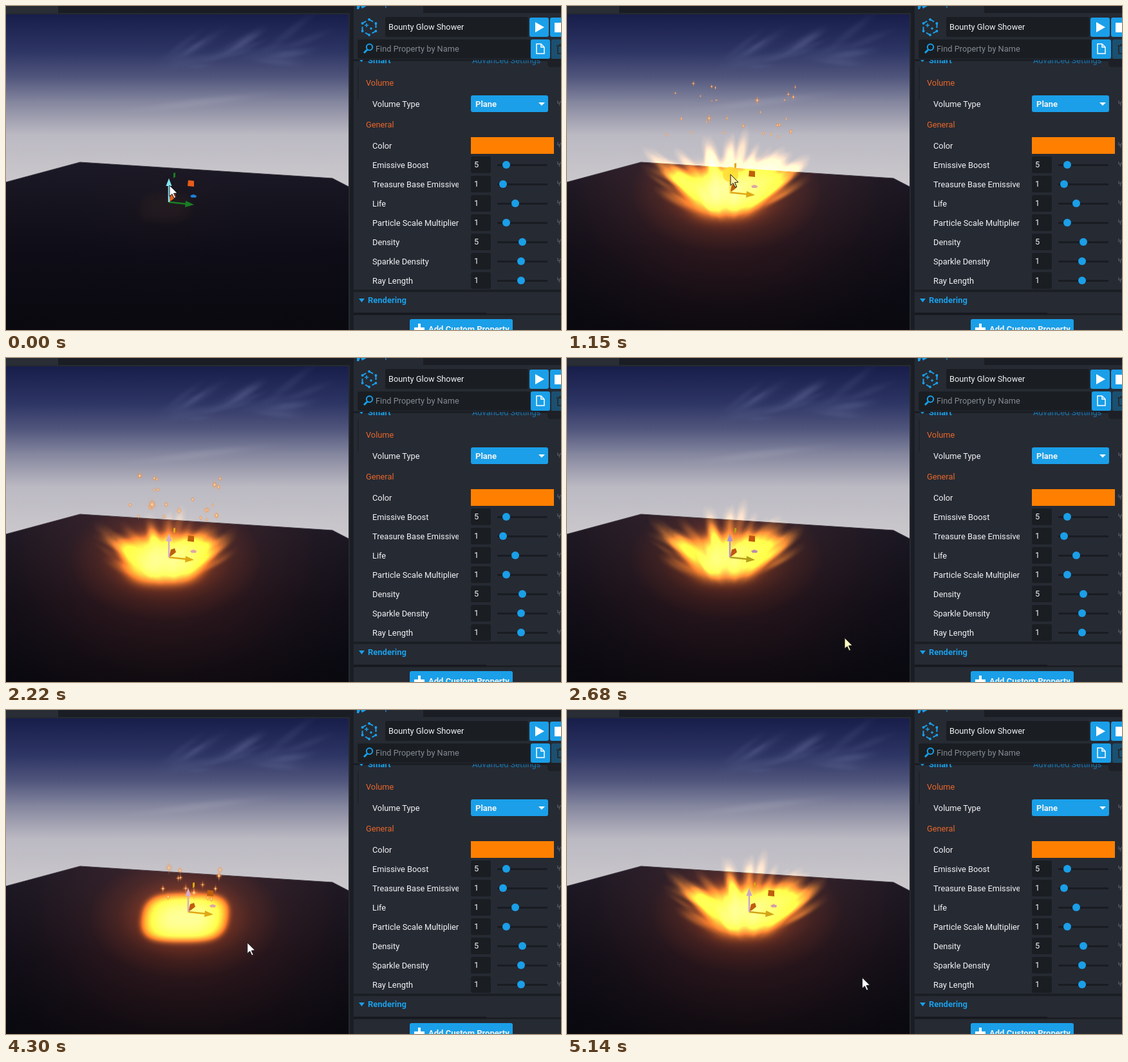
These frames come from a looping animation (862x504 px, 5.22 s). An HTML page with a canvas:

```html
<!DOCTYPE html>
<html lang="en">
<head>
<meta charset="utf-8">
<title>Particle effect editor</title>
<style>
  html, body { margin: 0; width: 100%; height: 100%; overflow: hidden; background: #1a1e24; }
  canvas, svg { position: absolute; left: 0; top: 0; }
  text { font: 12.8px Roboto, "Open Sans", sans-serif; fill: #f2f3f5; }
  .b { font-size: 13px; font-weight: 700; }
  .blue { fill: #1a9fe8; }
  .orange { fill: #e8672a; }
  .field { fill: #1a1e23; }
</style>
</head>
<body>
<canvas id="view" width="862" height="504"></canvas>
<svg id="panel" width="862" height="504">
  <defs>
    <clipPath id="label"><path d="M540 84H703V504H540z"/></clipPath>
    <clipPath id="list"><path d="M540 84H862V504H540z"/></clipPath>
  </defs>
  <path fill="#1a1e24" d="M0 0H862V13H0zM532 0H540V504H532z"/>
  <path fill="#292d35" d="M0 0H81V11H0z"/>
  <path fill="#262a30" d="M0 11H534V13H0zM532 13H534V504H532z"/>
  <path fill="#262a33" d="M540 11H862V504H540zM540 0H648V12H540z"/>
  <path class="blue" d="M545 0h5l-2 5h-3zM551 0h9l-7 4z"/>
  <text class="blue" x="569" y="0">Properties</text>

  <g fill="none" stroke="#1a9fe8" stroke-width="2">
    <path d="M564 21L574.500 27V39L564 45L553.500 39V27Z" stroke-dasharray="7 5"/>
    <path d="M560 27v6M557 30h6M567 33v4M565 35h4" stroke-width="1.500"/>
  </g>
  <g id="nodes" class="blue"></g>
  <rect class="field" x="589" y="17" width="222" height="31" rx="3"/>
  <text x="594" y="37">Bounty Glow Shower</text>
  <rect class="field" x="546" y="52" width="268" height="30" rx="3"/>
  <g fill="none" stroke="#1a9fe8" stroke-width="2">
    <circle cx="564.500" cy="64" r="4.700"/><path d="M561 68l-5 5" stroke-width="3"/>
  </g>
  <text x="574" y="71" style="fill:#858a92">Find Property by Name</text>
  <g class="blue">
    <rect x="813" y="18" width="30" height="30" rx="3"/>
    <rect x="845" y="18" width="30" height="30" rx="3"/>
    <rect x="815" y="52" width="30" height="30" rx="3"/>
  </g>
  <rect x="847" y="52" width="30" height="30" rx="3" fill="#1b5070"/>
  <path fill="#fff" d="M822 25L836 33L822 41zM852 26H862V41H852z"/>
  <path fill="none" stroke="#fff" stroke-width="1.500" d="M824 59h7l5 5v10h-12zM831 59v5h5"/>
  <path fill="none" stroke="#222e38" stroke-width="2" d="M855 62h9M857 63v11h7M859 60h5"/>
  <path fill="#181b20" d="M540 83H862V85.500H540z"/>

  <g clip-path="url(#list)">
    <path class="blue" d="M549 84h6l-3 3z"/>
    <text class="b blue" x="562" y="89">Smart</text>
    <text x="724" y="89" style="fill:#1a78b2">Advanced Settings</text>
    <path fill="#1d2127" d="M841 84H862V95H846Q841 95 841 90zM546 96h1.500v50h-1.500z"/>
  </g>
  <text class="orange" x="559" y="124">Volume</text>
  <text class="orange" x="559" y="189">General</text>
  <rect class="blue" x="722" y="139" width="120" height="26" rx="3"/>
  <text class="b" x="729" y="157">Plane</text>
  <path fill="#fff" d="M827 150h10l-5 5z"/>
  <path fill="#ff8000" d="M722 204H851V230H722z"/>
  <g id="rows" clip-path="url(#list)"></g>
  <path fill="#1b1f24" d="M540 441H862V445H540zM540 478H862V481H540z"/>
  <path fill="#17191e" d="M540 477H746V480H540z"/>
  <path class="blue" d="M548 455h9l-4.500 6z"/>
  <text class="b blue" x="562" y="462">Rendering</text>
  <rect class="blue" x="627" y="487" width="160" height="30" rx="3"/>
  <path fill="#fff" d="M640 494h4v6h6v4h-16v-4h6z"/>
  <text class="b" x="656" y="507">Add Custom Property</text>
</svg>
<script>
const byId = id => document.getElementById(id);
const times = (n, make) => Array.from({ length: n }, (_, i) => make(i));

byId("nodes").innerHTML = times(6, i =>
  `<circle cx="${564 + 12 * Math.sin(i * Math.PI / 3)}" cy="${33 - 12 * Math.cos(i * Math.PI / 3)}" r="2"/>`).join("");

const row = (name, y) => `<text x="569" y="${y + 5}" clip-path="url(#label)">${name}</text>
  <path d="M863 ${y - 4}a5 5 0 0 0 -3 7M857 ${y - 5}v4h4" fill="none" stroke="#50555c" stroke-width="1.500"/>`;
const slider = (value, knob, y) => `<rect class="field" x="722" y="${y - 13}" width="31" height="26" rx="3"/>
  <text x="727" y="${y + 4}">${value}</text>
  <rect x="763" y="${y - 1}" width="78" height="3" rx="1" fill="#191c21"/>
  <circle class="blue" cx="${knob}" cy="${y}" r="6"/>`;
const settings = [["Emissive Boost", 5, 777], ["Treasure Base Emissive", 1, 772], ["Life", 1, 791],
  ["Particle Scale Multiplier", 1, 777], ["Density", 5, 802], ["Sparkle Density", 1, 800], ["Ray Length", 1, 800]];
byId("rows").innerHTML = row("Volume Type", 152) + row("Color", 217) +
  settings.map(([name, value, knob], i) => row(name, 247 + 30 * i) + slider(value, knob, 247 + 30 * i)).join("");

const FRAMES = 68, LOOP = 5220, STEP = LOOP / FRAMES;
const ctx = byId("view").getContext("2d");

let seed = 11;
const rnd = () => (seed = seed * 16807 % 2147483647) / 2147483647;
const spread = () => rnd() * 2 - 1;
const rays = times(100, () => ({ u: spread(), v: spread(), h: rnd(), w: rnd() }));
const sparks = times(28, () => ({ u: spread(), v: spread(), s: .6 + rnd() ** 3 }));
const wisps = times(22, () => ({ u: spread(), v: spread(), w: rnd() }));

// peak: the moment the flame body is fullest; lead: how long sparks precede it
const bursts = [{ peak: 450, lead: 420, power: 1 }, { peak: 1840, lead: 250, power: .78 },
  { peak: 4300, lead: 1200, power: .92 }];
const cursorPath = [[0, 254, 279], [1150, 254, 262], [1550, 253, 282], [1840, 400, 520], [2250, 450, 520],
  [2680, 432, 436], [3300, 352, 369], [3600, 284, 312], [3960, 312, 317], [4300, 375, 362], [LOOP, 466, 421]];

const ramp = (a, b, t) => Math.min(1, Math.max(0, (t - a) / (b - a)));
const smooth = (a, b, t) => { const f = ramp(a, b, t); return f * f * (3 - 2 * f); };

function along(path, t) {
  const i = path.findIndex(k => k[0] > t), [t0, x0, y0] = path[i - 1], [t1, x1, y1] = path[i];
  const f = ramp(t0, t1, t);
  return [x0 + (x1 - x0) * f, y0 + (y1 - y0) * f];
}

function gizmoAt(t) {
  const lift = (5 + 15 * ramp(0, 1150, t)) * (1 - ramp(1150, 1550, t));
  const slide = smooth(3600, 3960, t);
  return [253 + 30 * slide, 310 + 4 * slide - lift];
}

function glow(x, y, rx, ry, angle, rgb, alpha) {
  ctx.save();
  ctx.translate(x, y);
  ctx.rotate(angle);
  ctx.scale(rx, ry);
  const g = ctx.createRadialGradient(0, 0, 0, 0, 0, 1);
  for (const [p, k] of [[0, 1], [.35, .75], [.7, .22], [1, 0]]) g.addColorStop(p, `rgba(${rgb},${alpha * k})`);
  ctx.fillStyle = g;
  ctx.fillRect(-1, -1, 2, 2);
  ctx.restore();
}

function vertical(y0, y1, stops) {
  const g = ctx.createLinearGradient(0, y0, 0, y1);
  stops.forEach(([y, c]) => g.addColorStop((y - y0) / (y1 - y0), c));
  return g;
}

function trace(points) {
  ctx.beginPath();
  points.forEach(([x, y]) => ctx.lineTo(x, y));
}

function poly(points, fill) {
  trace(points);
  ctx.closePath();
  ctx.fillStyle = fill;
  ctx.fill();
}

const skyFill = vertical(13, 274, [[13, "#181e4a"], [70, "#2d3564"], [110, "#50557c"], [150, "#85879f"],
  [200, "#bbb9c2"], [274, "#cbc8cc"]]);
const groundFill = vertical(243, 504, [[243, "#1b1926"], [300, "#15141f"], [380, "#0e0d17"], [504, "#09090f"]]);
const ground = [[0, 274], [115, 243], [507, 268], [532, 281], [532, 504], [0, 504]];

function scene() {
  ctx.fillStyle = skyFill;
  ctx.fillRect(0, 13, 532, 270);
  for (const { u, v, w } of wisps)
    glow(370 + u * 110, 68 - u * 14 + v * 30, 25 + 45 * w, 5 + 7 * w, -.35 + .5 * v, "115,124,170", .13);
  glow(300, 150, 130, 10, -.12, "195,195,210", .16);
  poly(ground, groundFill);
  ctx.strokeStyle = "#35323d";
  ctx.lineWidth = 1;
  trace(ground.slice(0, 4));
  ctx.stroke();
}

// Soft rounded slab whose top widens with flare.
function slab(x, y, scale, flare, blur, rgb, alpha) {
  const pow = v => Math.sign(v) * Math.abs(v) ** .75;
  ctx.filter = `blur(${blur}px)`;
  poly(times(48, i => {
    const a = i * Math.PI / 24, v = pow(Math.sin(a));
    const py = v * 38 + 2 * Math.sin(a * 3);
    return [x + scale * (pow(Math.cos(a)) * 66 * (1 - flare * v) - py * .14), y + scale * py];
  }), `rgba(${rgb},${alpha})`);
  ctx.filter = "none";
}

function fire(gx, gy, blob, ray) {
  const heat = Math.min(1, blob + ray), x = gx - 5, y = gy + 9 - 10 * ray;
  if (heat < .01) return;
  ctx.globalCompositeOperation = "lighter";
  ctx.save();
  trace(ground);
  ctx.clip();
  glow(x, y, 340, 260, 0, "75,26,14", heat * .5);
  glow(x, y, 150, 95, 0, "165,58,5", heat * .6);
  ctx.restore();

  const body = Math.max(blob, .8 * ray), size = .6 + .4 * heat, flare = .3 * ray;
  slab(x, y, size, flare, 5 + 5 * ray, "255,125,8", body);
  slab(x, y + 1, size * .84, flare, 7 + 3 * ray, "70,95,30", body);
  slab(x, y + 2, size * .62, flare, 11, "40,50,80", body);

  const reach = .45 + .55 * ray;
  for (const { u, v, h, w } of ray > .01 ? rays : []) {
    const bx = x + u * 56, by = gy + 10 + v * 30 * (1 - .3 * u * u);
    const dx = u * 68 * reach, dy = -(38 + 44 * h) * (1 - .3 * Math.abs(u)) * reach;
    glow(bx + dx / 2, by + dy / 2, Math.hypot(dx, dy) * .66, 6 + 7 * w, Math.atan2(dy, dx),
      "255,150,28", ray * (.12 + .3 * w));
  }
  ctx.globalCompositeOperation = "source-over";
}

function drawSparks(gx, gy, age, lead, step) {
  const alpha = smooth(-lead, 150 - lead, age) * (1 - smooth(690, 840, age));
  if (alpha < .02) return;
  const rise = smooth(0, 700, age);
  const width = 35 + 20 * smooth(-1000, 0, age) + 55 * rise;
  const centre = -44 - 84 * rise, height = 26 + 18 * rise;
  sparks.slice(0, 14 + 14 * rise).forEach(({ u, v, s }, i) => {
    const x = gx - 3 + u * width, y = gy + centre + v * height, r = s * (1 - .45 * rise);
    const a = alpha * (.75 + .25 * Math.sin(step * 1.7 + i * 2.3));
    glow(x, y, 7 * r, 8 * r, 0, "255,125,35", a * .7);
    glow(x, y, 1.6 * r, 13 * r, 0, "255,165,80", a);
    glow(x, y, 8 * r, 1.5 * r, 0, "255,165,80", a);
    glow(x, y, 3 * r, 3.5 * r, 0, "255,242,200", a);
  });
}

function gizmo(x, y, heat, t) {
  const mix = (cold, hot) => `rgb(${cold.map((c, i) => c + (hot[i] - c) * heat)})`;
  const lifted = t < 1550;
  const up = mix(lifted ? [127, 228, 247] : [52, 46, 190], lifted ? [255, 232, 90] : [212, 172, 205]);
  const green = mix([18, 125, 35], [224, 168, 20]);
  const red = mix(lifted ? [232, 92, 25] : [215, 50, 35], [190, 95, 12]);
  const blue = mix(lifted ? [25, 125, 215] : [50, 42, 190], [225, 165, 165]);
  ctx.save();
  ctx.translate(x, y);
  ctx.lineWidth = 2.5;
  ctx.strokeStyle = green;
  trace([[0, 0], [28, 3]]);
  ctx.stroke();
  poly([[26, -2], [39, 4], [25, 8]], green);
  poly([[7, -45], [10, -46], [10, -39], [7, -37]], green);
  poly([[0, 0], [3, -12], [9, -14], [11, -8], [6, -4]], red);
  poly([[30, -34], [39, -33], [39, -24], [29, -25]], red);
  poly([[33, -10], [38, -12], [43, -10], [42, -7], [35, -7]], blue);
  ctx.strokeStyle = up;
  trace([[0, 0], [0, -28]]);
  ctx.stroke();
  poly([[0, -37], [4.500, -25], [-4.500, -25]], up);
  ctx.restore();
}

function cursor(x, y, t) {
  const pressed = t > 400 && t < 1550 || t > 3600 && t < 3960;
  if (pressed) {
    ctx.fillStyle = "rgba(255,215,45,.75)";
    ctx.beginPath();
    ctx.arc(x, y, 12, 0, 7);
    ctx.fill();
  }
  const warm = t > 1550 && t < 3000;
  poly([[0, 0], [0, 17], [4, 13.500], [7, 20], [9.500, 19], [6.500, 12.500], [12, 12]].map(([a, b]) => [x + a, y + b]),
    pressed ? "#fff0a0" : warm ? "#fffbc0" : "#fff");
  ctx.strokeStyle = "#15151a";
  ctx.lineWidth = 1;
  ctx.stroke();
}

function draw(step) {
  const t = step * STEP, [gx, gy] = gizmoAt(t);
  let heat = 0;
  scene();
  for (const { peak, lead, power } of bursts) {
    const age = t - peak;
    const blob = smooth(-500, 0, age) * (1 - smooth(200, 900, age));
    const ray = power * smooth(0, 600, age) * (1 - smooth(850, 1250, age));
    fire(gx, gy, blob, ray);
    drawSparks(gx, gy, age, lead, step);
    heat = Math.max(heat, Math.min(1, blob + ray));
  }
  gizmo(gx, gy, heat, t);
  cursor(...along(cursorPath, t), t);
}

const start = performance.now();
let shown = -1;
function tick() {
  const step = Math.floor(((performance.now() - start) % LOOP + 10) / STEP) % FRAMES;
  if (step !== shown) draw(shown = step);
  requestAnimationFrame(tick);
}
tick();
</script>
</body>
</html>
```
